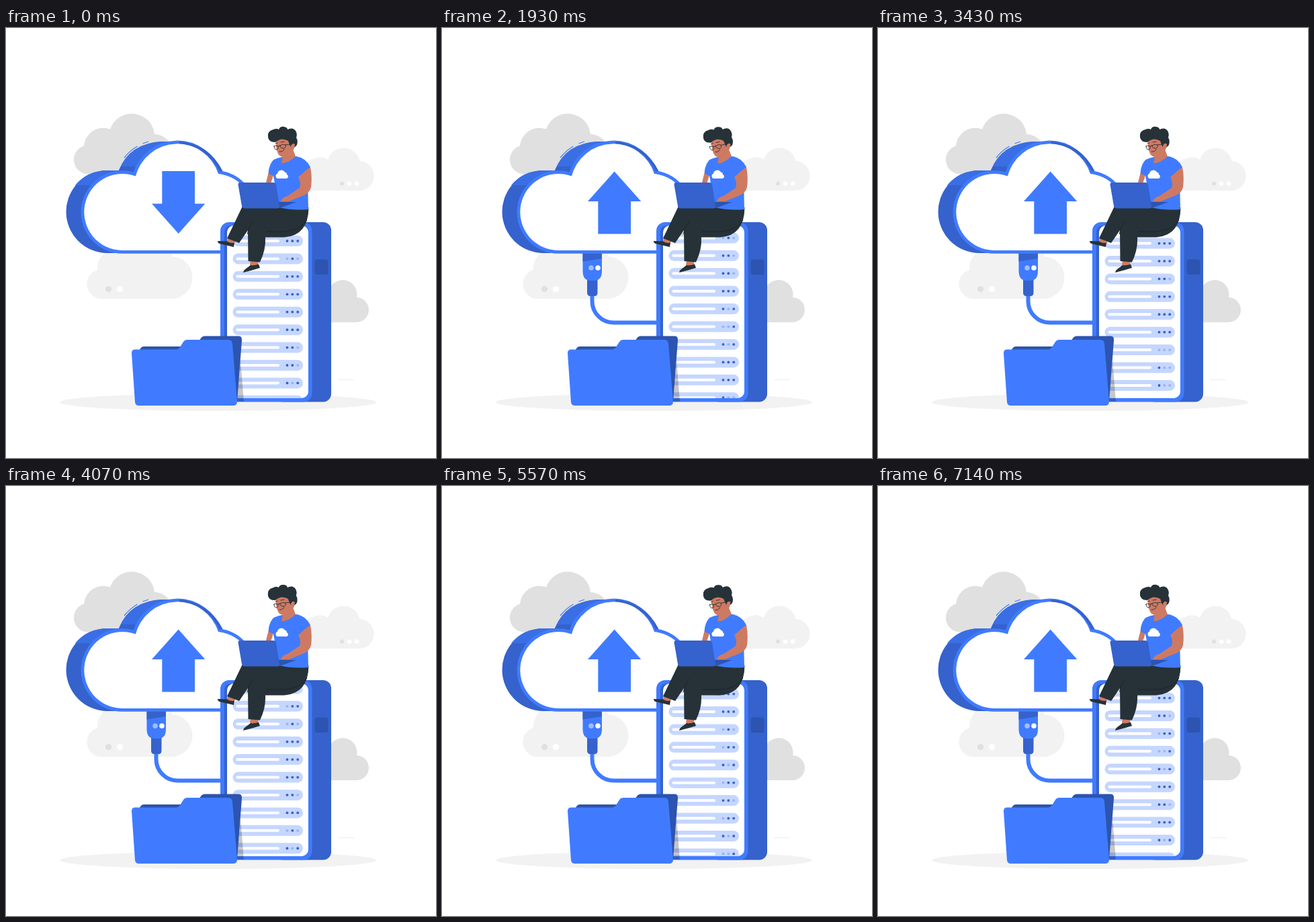
Write an HTML page that moves like this. It is 640 px wide and 640 px high and loops after 7.21 s.

```html
<!DOCTYPE html>
<html lang="en">
<head>
<meta charset="utf-8">
<title>Cloud hosting</title>
<style>
  html, body { margin: 0; width: 100%; height: 100%; overflow: hidden; background: #fff; }
  svg { display: block; width: 100vw; height: 100vh; }
  .blue { fill: #407bff; }
  .side { fill: #3562cc; }
  .deep { fill: #2c54b0; }
  .pale { fill: #f2f2f2; }
  .grey { fill: #e0e0e0; }
  .white { fill: #fff; }
  .skin { fill: #ce7a63; }
  .ink { fill: #263238; }
  .line { fill: none; stroke: #263238; stroke-width: .9; stroke-linecap: round; }
</style>
</head>
<body>
<svg viewBox="0 0 640 640">
  <defs>
    <clipPath id="panel"><rect x="329" y="294" width="121" height="257" rx="10"/></clipPath>
    <clipPath id="aboveFloor"><rect width="640" height="545"/></clipPath>
    <path id="cloudFace" d="M173 331A57 57 0 1 1 193 220.500A64 64 0 0 1 316 217A58 58 0 0 1 324 331Z"/>
  </defs>

  <!-- backdrop -->
  <ellipse class="pale" cx="315.500" cy="557" rx="235.500" ry="13"/>
  <path d="M494 523.500H518" stroke="#ededed"/>
  <path class="grey" d="M123 217.500A21.500 21.500 0 0 1 116 175.500A29 29 0 0 1 155 150.500A34 34 0 0 1 221 158A28 28 0 0 1 248 182V217.500Z"/>
  <path class="pale" d="M440 242V214Q446 197 457 195Q468 189 479 196A24.500 24.500 0 0 1 526.500 198A22 22 0 0 1 525 242Z"/>
  <circle class="grey" cx="500" cy="231.500" r="3"/>
  <circle class="white" cx="511" cy="231.500" r="3.300"/>
  <circle class="white" cx="522" cy="231.500" r="3.300"/>
  <path class="pale" d="M144 403A22 22 0 0 1 136 360Q136 342 149 333H247V340A31.500 31.500 0 0 1 245 403Z"/>
  <circle class="grey" cx="152.500" cy="388.500" r="4.600"/>
  <circle class="white" cx="169.500" cy="388.500" r="4.600"/>
  <path class="grey" d="M480 438V392A21 21 0 0 1 522 401A18.500 18.500 0 0 1 521 438Z"/>

  <!-- plug and cable -->
  <g clip-path="url(#aboveFloor)">
    <g id="plug">
      <path d="M223.500 397V406A32 32 0 0 0 256 438.500H330" fill="none" stroke="#407bff" stroke-width="6"/>
      <path class="side" d="M216 372H231.500V394Q231.500 399 227 399H221Q216 399 216 394Z"/>
      <path class="blue" d="M209.500 335H238V362Q238 376 226 376H221.500Q209.500 376 209.500 362Z"/>
      <path class="side" d="M209.500 335H238V343L209.500 347.500Z"/>
      <circle cx="222" cy="357" r="3.800" fill="#9fbdff"/>
      <circle class="white" cx="232" cy="357" r="3.800"/>
    </g>
  </g>

  <!-- main cloud -->
  <path class="side" d="M173 335H151A61.500 61.500 0 0 1 151 212H168Q184 171 233 169H256Q302 172 323 214L254 240Z"/>
  <path d="M168 212Q184 171 233 169H256L193 220Q183 212 168 212Z" fill="#3a6ee4"/>
  <path d="M103 234Q121 212 151 212H168L126 234Z" fill="#3a6ee4"/>
  <path class="side" d="M168 212L171 206H192L191 219Q181 212 168 212Z"/>
  <use href="#cloudFace" fill="#407bff" stroke="#407bff" stroke-width="9.500"/>
  <path d="M258 170.500Q301 175 320 213" fill="none" stroke="#3562cc" stroke-width="4"/>
  <use href="#cloudFace" class="white"/>
  <path d="M176 193Q185 182 195.500 176M203.500 172L212 169" fill="none" stroke="#407bff" stroke-width="1.200"/>
  <path id="arrow" class="blue" d="M232.300 213H281V261.500H296.300L256.600 306L217 261.500H232.300Z"/>

  <!-- server -->
  <rect class="side" x="400" y="289" width="84" height="267.500" rx="12"/>
  <rect class="blue" x="319" y="289" width="136.500" height="267.500" rx="13"/>
  <path class="side" d="M325 545V304Q325 294 335 294H345V551H335Q325 551 325 541Z"/>
  <rect class="white" x="329" y="294" width="121" height="257" rx="10"/>
  <rect class="deep" x="459.500" y="344.500" width="20" height="22.500" rx="4"/>
  <g id="rows" clip-path="url(#panel)"></g>

  <!-- folder -->
  <path d="M349 494L354 556H343Z" fill="#000" opacity=".22"/>
  <path class="deep" d="M288 466Q290 458.500 296 458.500H346Q351.500 458.500 351 465L344 556H330L300 470ZM198 482Q200 474 205 474H262V482Z"/>
  <path class="blue" d="M187 484Q187 478.500 192 478.500H253Q257 478.500 259 475L264 467Q266 464 270 464H331Q336.500 464 337 470L344 556Q344 562 338 562H198Q192.500 562 192 557Z"/>

  <!-- seated person -->
  <path class="skin" d="M330 311L342 316L339 322L329 318ZM364 345L376 346L374 356L363 354Z"/>
  <path class="ink" d="M315 317L329 317.500Q334 321 340 319.500L339 326L318 321Q315 320 315 317ZM353 364Q353 361 356 359L364 353Q370 354 376 351.500L378 357L368 360Z"/>
  <path class="skin" d="M391 214L386.500 232H394L399 216Z"/>
  <path class="ink" d="M355 259L329 313L347 320L360 301L360.500 347L378 348.500Q387 330 386 311.500H414Q450 309 450.500 267L400 264Z"/>
  <path d="M359 307Q362 293 369 287M387 303H414Q437 302 448 286" fill="none" stroke="#192328" stroke-width=".8"/>
  <path class="blue" d="M411 192Q397 194 394 202Q390 211 391 217L398 220L400 231L405 267Q428 272 450 270L449 225L453 207Q446 193 432 191Z"/>
  <path class="skin" d="M453 207Q456 221 454 237Q452 246 441 250L421 258H409Q411 252 419 250L437 238Q440 230 435 222Q443 214 453 207Z"/>
  <path class="white" d="M404 224A4 4 0 0 1 404 216.500A6 6 0 0 1 415 214.500Q418 215 418 218A3.300 3.300 0 0 1 418 224Z"/>
  <path class="deep" d="M403 259H432L409 267.500H403Z"/>
  <path class="side" d="M345.500 233Q345.500 230 348 230H398Q401.500 230 402 233L407 265Q407 268.500 404 268.500H355Q351.500 268.500 351 265Z"/>
  <g id="head">
    <path class="skin" d="M413 186L410 201Q419 202 431 191L426 178Z"/>
    <path class="skin" d="M402 166Q401 177 404 185Q407 193 414 191.500Q425 191 430 176L426 163Z"/>
    <path class="ink" d="M401 170Q391 170 390 162Q389 153 398 151Q403 149 406 151Q408 146 414 147Q419 148 419 151Q427 147 431 153Q434 158 432 163Q435 168 433 174Q429 180 423 176L420 168Q410 162 401 170Z"/>
    <path class="skin" d="M424 175Q427 170 430 173Q430 179 425 180Z"/>
    <path class="line" d="M391 157Q389 167 396 169M399 176Q402 174 405 176Q406 180 403 181Q399 181 399 176ZM408 175Q412 172 416 174Q417 179 413 179Q408 179 408 175ZM405 176L408 175M416 174L424 173M407 184Q412 185 414 180.500M401 172L404 171M409 170L414 169"/>
  </g>
</svg>

<script>
const LOOP = 7210, STEP = LOOP / 101;
const PITCH = 26.43, SCROLL = 0.02982, FIRST_ROW = 317;
const PLUG_IN = 1360, BLINK = 640;
const ROW_COUNT = 12;

const get = id => document.getElementById(id);
const [plug, arrow, head, rowLayer] = ["plug", "arrow", "head", "rows"].map(get);

const random = seed => {
  const x = Math.sin(seed * 127.1 + 11.7) * 43758.5453;
  return x - Math.floor(x);
};
const smooth = u => u * u * (3 - 2 * u);

const rowMarkup = `<g>
  <rect x="337.500" y="-8" width="104.500" height="16" rx="8" fill="#c5d6ff"/>
  <rect x="342.500" y="-2" width="64.500" height="4" rx="2" fill="#fff"/>
  ${[418.5, 426.3, 434.2].map(x => `<circle class="side" cx="${x}" r="1.900"/>`).join("")}
</g>`;
rowLayer.innerHTML = rowMarkup.repeat(ROW_COUNT);
const rows = [...rowLayer.children].map(node => ({ node, dots: node.querySelectorAll("circle") }));

function drawRows(t) {
  const shift = t * SCROLL;
  const first = Math.floor(shift / PITCH) - 1;
  rows.forEach(({ node, dots }, i) => {
    const index = first + i;
    node.setAttribute("transform", `translate(0 ${FIRST_ROW + index * PITCH - shift})`);
    dots.forEach((dot, j) => {
      const seed = index * 3 + j + Math.floor(t / BLINK) * 61;
      dot.setAttribute("opacity", random(seed) < 0.25 ? 0.3 : 1);
    });
  });
}

function draw(t) {
  const away = 1 - smooth(Math.min(t / PLUG_IN, 1));
  plug.setAttribute("transform", `translate(${6 * away} ${145 * away})`);
  arrow.setAttribute("transform", t < PLUG_IN ? "" : "matrix(1 0 0 -1 0 519.500)");
  const nod = (1 - Math.cos(4 * Math.PI * t / LOOP)) / 2;
  head.setAttribute("transform", `rotate(${-2.2 * nod} 421 191)`);
  drawRows(t);
}

function frame() {
  const t = performance.now() % LOOP;
  draw(Math.floor((t + 3) / STEP) % 101 * STEP);
  requestAnimationFrame(frame);
}
frame();
</script>
</body>
</html>
```
